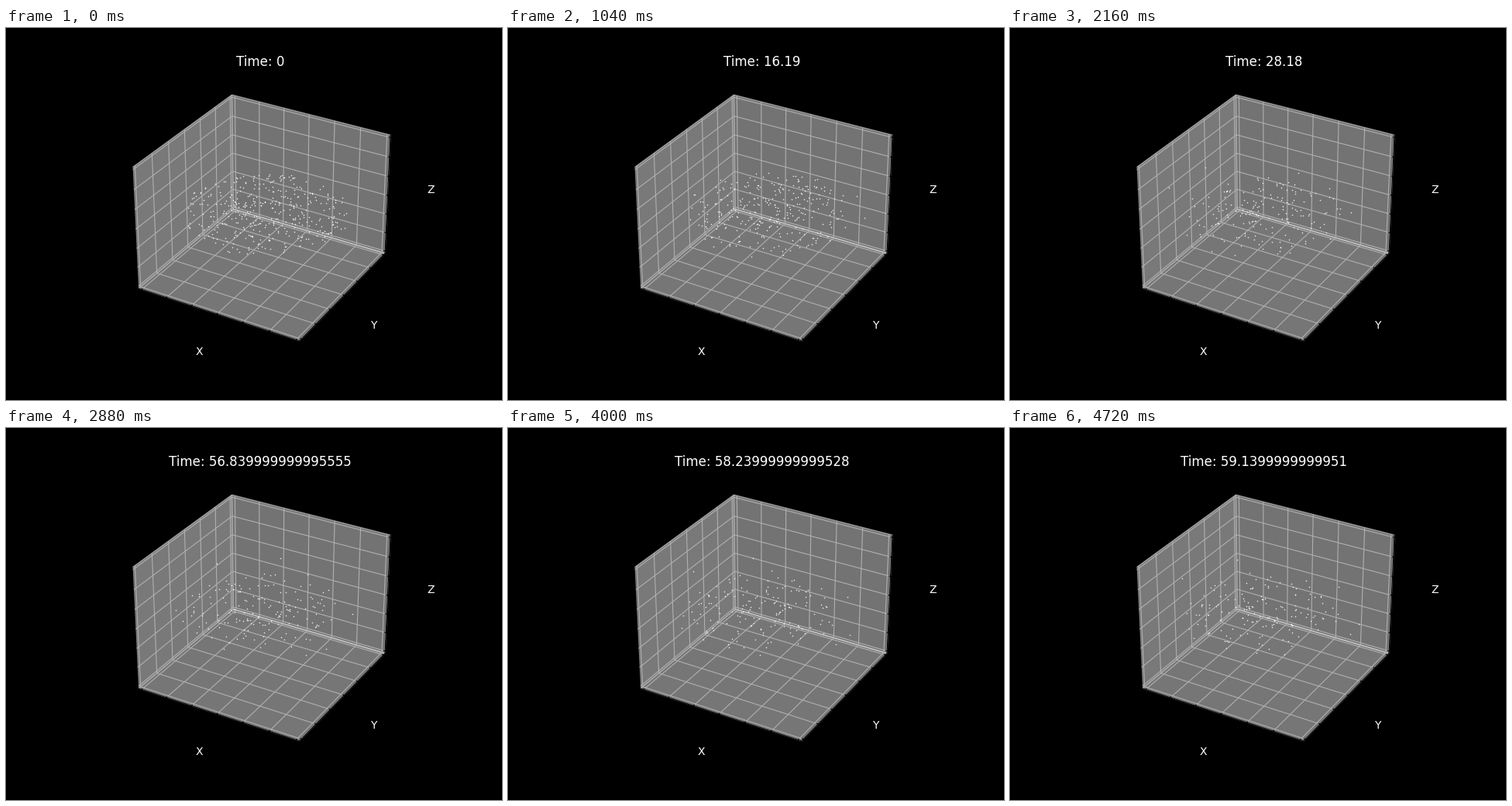
Animation, 640 px wide and 480 px high, one loop 4800 ms. Source, as a matplotlib script:

```python
from itertools import accumulate, repeat

import matplotlib.pyplot as plt
import numpy as np
from matplotlib.animation import FuncAnimation

FRAMES = 60
INTERVAL = 80
LATE = 28            # first frame of the finely sampled part
GM = 2.2             # central mass, sets the orbital speed
LIMIT = 3.125
REF_TIME = 56.84     # time at which the wide orbits' phases are given

# Clock: coarse samples first, then small steps summed in floating point.
late_clock = list(accumulate(repeat(0.01, 2464), initial=34.5))


def clock(i):
    if i == 0:
        return 0
    if i < LATE:
        return round(float(np.interp(i, [0, 6, 13, 27], [0, 11.76, 16.19, 28.18])), 2)
    return late_clock[2464 - 10 * (FRAMES - 1 - i)]


# Disc of particles on slightly tilted, slightly eccentric orbits.
rng = np.random.default_rng(12)
N = 375
radius = 0.35 + 2.4 * rng.uniform(0, 1, N) ** 0.75
phase = rng.uniform(0, 2 * np.pi, N)
node = rng.uniform(0, 2 * np.pi, N)
ecc = rng.uniform(0, 0.06, N)
tilt = rng.normal(0, 0.04, N)
drift = rng.normal(-0.06, 0.09, N)
omega = np.sqrt(GM / radius**3)

# A few bodies scattered outwards: final radius and viewing angle.
wide_radius = np.array([3.9, 3.85, 3.15, 3.1, 3.0, 3.0])
wide_phase = np.array([1.42, 2.03, -0.87, -1.12, -0.04, 3.1]) + np.pi / 6
wide_omega = np.sqrt(GM / wide_radius**3)


def positions(i):
    t = clock(i)
    n = int(np.interp(i, [0, 6, 13, 27, 36, 59], [375, 335, 290, 175, 160, 152]))
    spread = min(t / 28, 1)

    angle = phase[:n] + omega[:n] * t
    r = radius[:n] * (1 + drift[:n] * spread) * (1 + ecc[:n] * np.cos(angle + node[:n]))
    z = r * tilt[:n] * np.sin(angle - node[:n])

    wide_r = 2.6 + (wide_radius - 2.6) * spread
    wide_angle = wide_phase + wide_omega * (t - REF_TIME)

    r = np.append(r, wide_r)
    angle = np.append(angle, wide_angle)
    z = np.append(z, np.zeros(len(wide_r)))
    return r * np.cos(angle), r * np.sin(angle), z


fig = plt.figure(figsize=(6.4, 4.8), dpi=100, facecolor="black")
ax = fig.add_subplot(projection="3d", facecolor="black")
ax.view_init(elev=30, azim=-60)
dots, = ax.plot([], [], [], "o", color="white", alpha=0.85,
                markersize=1.15, markeredgewidth=0)

ax.set(xlim=(-LIMIT, LIMIT), ylim=(-LIMIT, LIMIT), zlim=(-LIMIT, LIMIT))
for axis in (ax.xaxis, ax.yaxis, ax.zaxis):
    axis.set_ticks(np.arange(-3, 4))
    axis.set_ticklabels([])


def label(text, x, y, size=10):
    return fig.text(x / 640, 1 - y / 480, text, color="white", size=size,
                    ha="center", va="baseline")


title = label("Time: 0", 328, 49.27, size=12)
label("X", 249.2, 422)
label("Y", 474.7, 388)
label("Z", 548.3, 213)


def draw(i):
    dots.set_data_3d(*positions(i))
    title.set_text(f"Time: {clock(i)}")
    return dots, title


anim = FuncAnimation(fig, draw, frames=FRAMES, interval=INTERVAL,
                     init_func=lambda: draw(0), repeat=True, repeat_delay=0)
plt.show()
```
